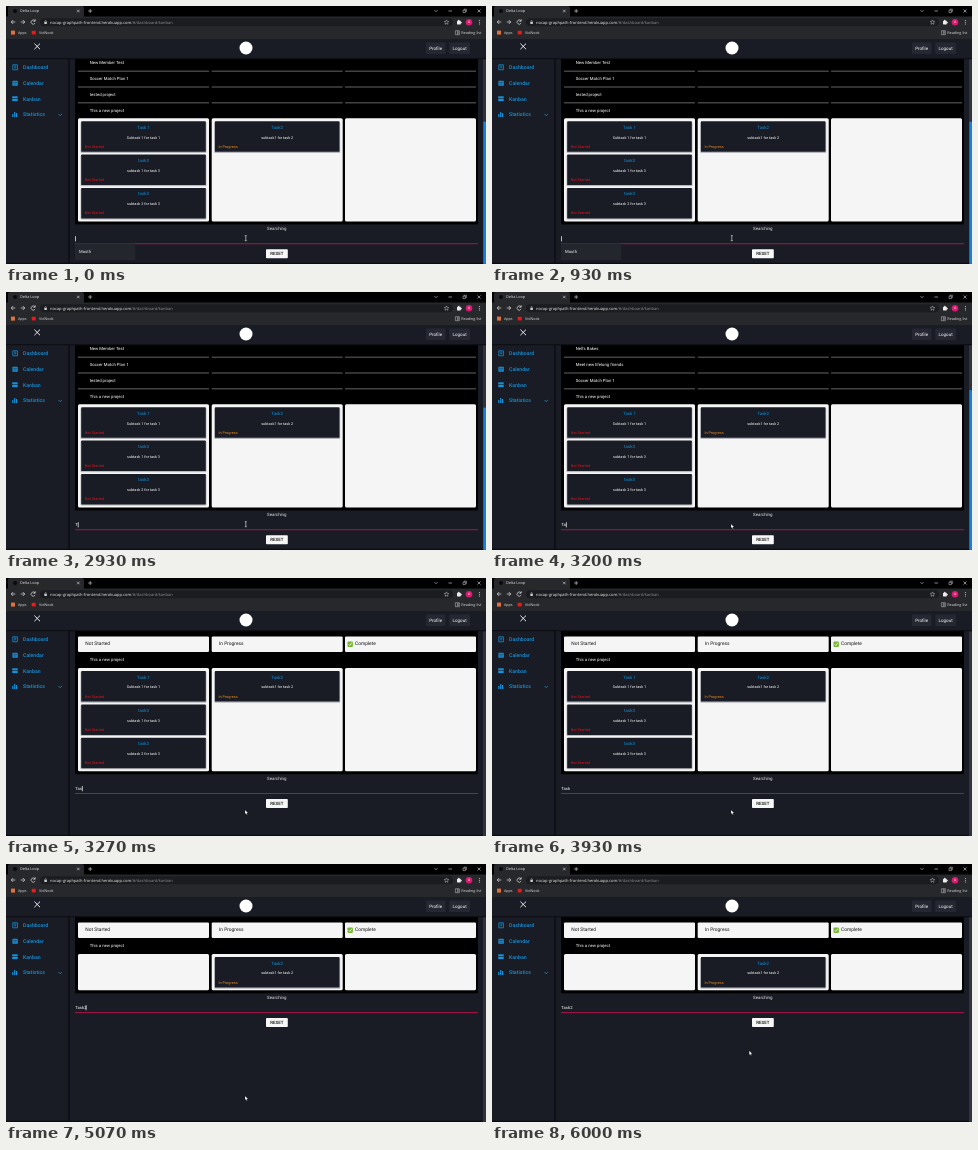
An HTML page for the animation above (6.07 s loop, 480 px wide and 258 px high).

```html
<!DOCTYPE html>
<html lang="en">
<head>
<meta charset="utf-8">
<title>Kanban search</title>
<style>
html, body { margin: 0; width: 100%; height: 100%; overflow: hidden; background: #191c24; }
svg { display: block; width: 480px; height: 258px; font-family: Roboto, sans-serif; text-rendering: geometricPrecision; }
.ui { font-family: "Open Sans", sans-serif; }
</style>
</head>
<body>
<svg id="stage" viewBox="0 0 480 258"></svg>
<script>
const LOOP = 6070;
const COLS = [72, 205.7, 339];
const COL_W = 131;
const BG = '#191c24', BLUE = '#1592dc', PAPER = '#f5f5f5';

const rect = (x, y, w, h, fill, r = 0) =>
  `<rect x="${x}" y="${y}" width="${w}" height="${h}" rx="${r}" fill="${fill}"/>`;
const circle = (x, y, r, fill) => `<circle cx="${x}" cy="${y}" r="${r}" fill="${fill}"/>`;
const line = (d, color = '#ddd', w = .7) =>
  `<path d="${d}" fill="none" stroke="${color}" stroke-width="${w}"/>`;
// y is the middle of the lowercase letters' line
const text = (s, x, y, size, fill = '#fff', extra = '') =>
  `<text x="${x}" y="${y + size * .35}" font-size="${size}" fill="${fill}" ${extra}>${s}</text>`;
const MID = 'text-anchor="middle"';

function browser() {
  const grey = '#c8c9cc';
  return `<g class="ui">` +
    rect(0, 0, 480, 11, '#000') + rect(2, 0, 76, 12, '#27282b', 2) +
    rect(0, 10.5, 480, 22.5, '#27282b') + rect(34, 12.3, 413, 8, '#1b1c1f', 4) +
    circle(9, 5, 2, '#08090b') + text('Delta Loop', 14, 5, 3.8, '#e4e4e4') +
    line('M71 3.7l2.6 2.6m0-2.6l-2.6 2.6M82.2 5h4m-2-2v4', '#ddd', .6) +
    line('M428.5 4.2l1.5 1.5 1.5-1.5M442.5 5h3.5M471.5 3.5l3 3m0-3l-3 3', '#ddd', .6) +
    line('M457 4.2h2.4v2.4h-2.4zM458 4v-.8h2.4v2.4h-.8', '#ddd', .5) +
    line('M9.3 16H5.2m2-2l-2 2 2 2M14.7 16h4.1m-2-2l2 2-2 2') +
    line('M29 15a2.1 2.1 0 1 0 .1 2M29.2 13.2v2h-2') +
    rect(38.3, 15.8, 2.6, 2.1, grey, .3) + line('M38.9 16v-.8a.7.7 0 0 1 1.4 0v.8', grey, .4) +
    text('nocap-graphpath-frontend.herokuapp.com<tspan fill="#8d9095">/#/dashboard/kanban</tspan>', 44, 16.1, 4.05, '#eee') +
    line('M440.5 13.9l.7 1.5 1.6.2-1.2 1.1.3 1.6-1.4-.8-1.4.8.3-1.6-1.2-1.1 1.6-.2z', grey, .5) +
    rect(451, 14.8, 3.8, 3.6, '#eee', .6) + circle(452.8, 14.5, .8, '#eee') + circle(455, 16.6, .8, '#eee') +
    circle(463, 16.2, 3.3, '#d81b70') + text('A', 463, 16.2, 3.5, '#fff', MID) +
    [14.4, 16.2, 18].map(y => circle(473.4, y, .5, '#ddd')).join('') +
    rect(5, 24.6, 4, 4, '#e0703c') + text('Apps', 12, 26.6, 3.7, '#ddd') +
    rect(25.7, 24.8, 4, 3.6, '#f01818') + text('VidNook', 33, 26.6, 3.7, '#ddd') +
    line('M449.4 24.7h4v4h-4zM451.4 25v3.5M451.8 26h1.2m-1.2 1.2h1.2', grey, .5) +
    text('Reading list', 455.3, 26.6, 3.75, '#ddd') + `</g>`;
}

function chrome() {
  const items = ['Dashboard', 'Calendar', 'Kanban', 'Statistics'].map((name, i) => {
    const y = 61.5 + i * 15.7;
    return text(name, 17, y, 5.2, BLUE, 'font-weight="500"');
  }).join('');
  const icons =
    line('M6.8 58.8h4.6v5H6.8zM8.2 60.2h2m-2 1.6h2', BLUE, .8) +
    rect(6.4, 74.8, 5.4, 5, BLUE, .6) + line('M7 76.3h4.2M7.5 78h3', BG, .5) +
    rect(6.2, 90.3, 5.5, 2.1, BLUE) + rect(6.2, 93, 5.5, 2.1, BLUE) +
    rect(6.2, 108, 1.2, 3, BLUE) + rect(8.1, 106, 1.2, 5, BLUE) + rect(10, 107, 1.2, 4, BLUE) +
    line('M52.5 108l1.7 1.7 1.7-1.7', BLUE, .8);
  return rect(0, 33, 480, 19, BG) + rect(0, 52, 480, 1.3, '#0d0f14') +
    line('M28.4 37.6l5.6 5.6m0-5.6l-5.6 5.6', '#fff', .9) +
    circle(240, 42, 6.5, '#fff') +
    rect(420, 36.5, 19.5, 11.5, '#252832', 1) + text('Profile', 429.6, 42.4, 4.5, '#fff', MID) +
    rect(443.2, 36.5, 20.8, 11.5, '#252832', 1) + text('Logout', 453.6, 42.4, 4.5, '#fff', MID) +
    rect(62, 53, 2, 205, '#0e1016') + items + icons;
}

function card(x, y, [title, sub, status]) {
  return rect(x + 2.5, y + .6, 126, 31, '#b9bac0', 1) + rect(x + 3.2, y, 124.6, 30.5, BG, .6) +
    text(title, x + 65.5, y + 5.9, 4.4, BLUE, MID) +
    text(sub, x + 65.5, y + 15.9, 3.75, '#fff', MID) +
    text(status, x + 6.7, y + 25.2, 3.8, status[0] === 'N' ? '#e8101c' : '#f08a1c');
}

const TODO = [
  ['Task 1', 'Subtask 1 for task 1', 'Not Started'],
  ['task3', 'subtask 1 for task 3', 'Not Started'],
  ['task3', 'subtask 2 for task 3', 'Not Started']
];
const DOING = [['Task2', 'subtask1 for task 2', 'In Progress']];

function columns(top, height, lists) {
  return COLS.map((x, i) => rect(x, top, COL_W, height, PAPER, 1.5) +
    lists[i].map((c, k) => card(x, top + 3.1 + k * 33.3, c)).join('')).join('');
}

function rows(names) {
  return names.map((name, i) => {
    const y = 56.8 + i * 15.9;
    const rule = i < 3 ? COLS.map(x => rect(x, y + 8, COL_W, .6, '#a5a5a5')).join('') : '';
    return text(name, 83.7, y, 4.25) + rule;
  }).join('');
}

function headers() {
  return COLS.map((x, i) => rect(x, 58.4, COL_W, 15.6, PAPER, 1.2) +
    text(['Not Started', 'In Progress', 'Complete'][i], x + (i === 2 ? 10 : 7.3), 65.6, 4.85, '#111')).join('') +
    rect(341.5, 63.5, 5.4, 5.4, '#74b72e', .8) + line('M342.8 66.2l1.1 1.3 2-2.9', '#fff', .7) +
    text('This a new project', 83.7, 82, 4.25);
}

// Search field and reset button hang below the board
function search(y, value, caretX) {
  return text('Searching', 270.8, y, 4.4, '#e8e8e8', MID) +
    text(value, 69.3, y + 10.3, 4.2) +
    (caretX ? rect(caretX, y + 8, .7, 5.2, '#fff') : '') +
    rect(69, y + 15.1, 403, .9, '#b8134a') +
    rect(260, y + 21, 21.8, 9, '#f7f7f7', .8) +
    text('RESET', 270.9, y + 25.5, 4.4, '#111', MID + ' font-weight="500"');
}

function dropdown() {
  return rect(69, 237.6, 60.3, 16.4, '#23262c', .8) + text('Mouth', 73, 245.6, 4.2, '#eee');
}

function pointer(t) {
  if (t < 3130) return line('M238.8 229.7h2m-1 0v5m-1 0h2', '#eee', .6);
  const [x, y] = t < 5870 ? [239, 232] : t < 5930 ? [242, 225] : t < 6000 ? [250, 206] : [257.2, 186.8];
  return `<path transform="translate(${x} ${y})" d="M0 0v4.1l1-.8.7 1.4.7-.3-.6-1.4h1.3z" fill="#fff" stroke="#000" stroke-width=".2"/>`;
}

const VALUES = [[5070, 'Task2', 79.7], [3400, 'Task', 77.8], [3270, 'Tas', 75.9], [3130, 'Ta', 73.9], [2730, 'T', 71.8], [0, '', 69.1]];
const BLINKS = [0, 400, 930, 1470, 2070, 2530, 2730, 3930, 4470, 4930, 5070, 5670];

function scene(t) {
  const [, value, x] = VALUES.find(v => t >= v[0]);
  const caret = BLINKS.filter(b => t >= b).length % 2 ? x : 0;
  const scrolled = t < 3270, narrow = t >= 5070;
  const colTop = scrolled ? 112.2 : 90;
  const colHeight = narrow ? 36.3 : 103.2;
  const boardEnd = colTop + colHeight + 3;
  const names = t < 3130
    ? ['New Member Test', 'Soccer Match Plan 1', 'tested project', 'This a new project']
    : ["Nell's Bakes", 'Meet new lifelong friends', 'Soccer Match Plan 1', 'This a new project'];
  const thumb = t < 3130 ? 115.5 : 98;
  return rect(0, 0, 480, 258, BG) +
    rect(69, 53, 403, boardEnd - 53, '#000') +
    (scrolled ? rows(names) : headers()) +
    columns(colTop, colHeight, [narrow ? [] : TODO, DOING, []]) +
    search(boardEnd + 3.8, value, caret) +
    (t < 2730 ? dropdown() : '') +
    rect(477, 53, 3, 205, '#30333b') +
    (scrolled ? rect(477.3, thumb, 2.7, 258 - thumb, '#1682d8', 1) : '') +
    chrome() + browser() + rect(0, 256.8, 477, 1.2, '#0b0c10') + pointer(t);
}

const stage = document.getElementById('stage');
const start = performance.now();
let shown = '';
function draw(now) {
  const next = scene(Math.max(0, now - start) % LOOP);
  if (next !== shown) stage.innerHTML = shown = next;
  requestAnimationFrame(draw);
}
draw(start);
</script>
</body>
</html>
```
